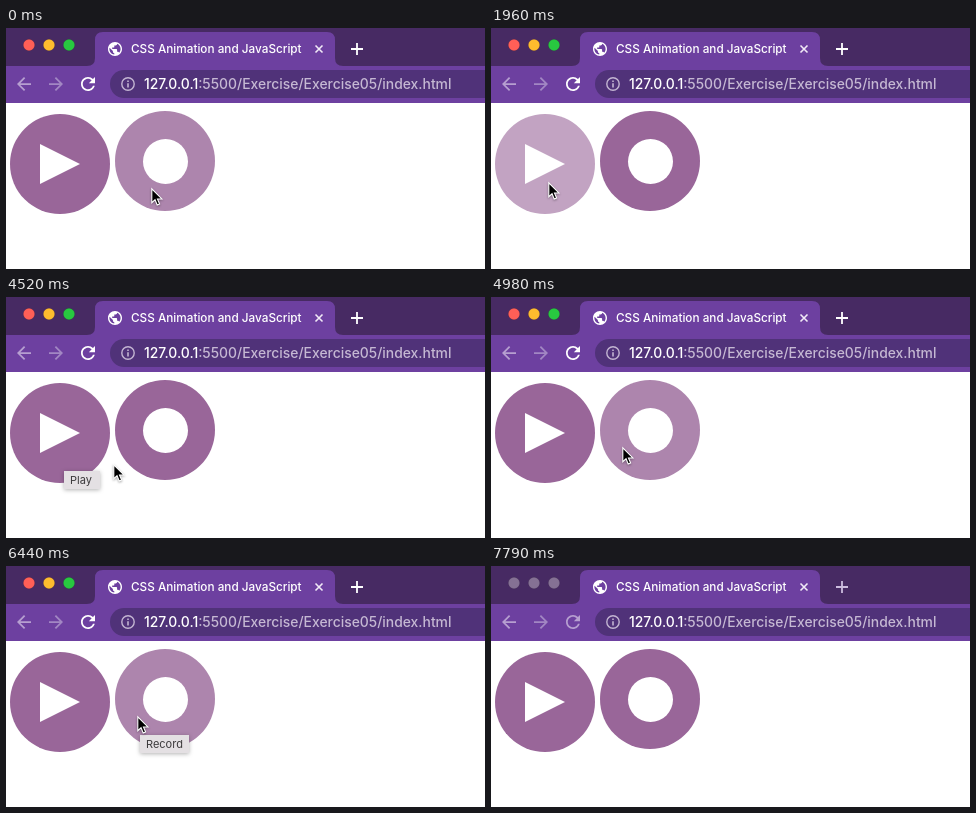
Write an HTML page that moves like this. It is 479 by 241 pixels and loops after 7.81 s.

```html
<!DOCTYPE html>
<html lang="en">
<head>
<meta charset="utf-8">
<title>CSS Animation and JavaScript</title>
<style>
html, body { margin: 0; width: 100%; height: 100%; overflow: hidden; background: #fff; }
svg { display: block; width: 479px; height: 241px; font-family: Inter, Roboto, sans-serif; }
#lights circle { stroke: rgba(0, 0, 0, .14); stroke-width: .7; }
#tip rect { fill: #e4e0e3; filter: drop-shadow(0 1px 2px rgba(0, 0, 0, .3)); }
#tip text { font-size: 11px; fill: #3c3a3c; }
.bar { font-weight: 500; }
.line { fill: none; stroke-width: 1.8; }
</style>
</head>
<body>
<svg viewBox="0 0 479 241">
  <defs>
    <path id="arrow" d="M20 11H7.830l5.590-5.590L12 4l-8 8 8 8 1.410-1.410L7.830 13H20z"/>
  </defs>
  <rect width="479" height="241" fill="#fff"/>

  <!-- window frame -->
  <rect width="479" height="38" fill="#472a63"/>
  <rect y="38" width="479" height="37" fill="#6d40a0"/>
  <path d="M81 38q8 0 8-8V12q0-8 8-8H321q8 0 8 8V30q0 8 8 8z" fill="#6d40a0"/>
  <g id="lights">
    <circle cx="23" cy="17" r="5.700"/>
    <circle cx="43" cy="17" r="5.700"/>
    <circle cx="63" cy="17" r="5.700"/>
  </g>
  <path transform="translate(100.600 12.600) scale(.7)" fill="#fff" d="M12 2C6.480 2 2 6.480 2 12s4.480 10 10 10 10-4.480 10-10S17.520 2 12 2zm-1 17.930c-3.950-.490-7-3.850-7-7.930 0-.620.080-1.210.210-1.790L9 15v1c0 1.100.900 2 2 2zm6.900-2.540c-.260-.810-1-1.390-1.900-1.390h-1v-3c0-.550-.450-1-1-1H8v-2h2c.550 0 1-.450 1-1V7h2c1.100 0 2-.900 2-2v-.410c2.930 1.190 5 4.060 5 7.410 0 2.080-.800 3.970-2.100 5.390z"/>
  <text class="bar" x="125" y="25" font-size="11.750" fill="#fff">CSS Animation and JavaScript</text>
  <path class="line" d="M309.500 17.500l7 7m0-7l-7 7" stroke="#f1eaf7" style="stroke-width:1.6"/>
  <path class="line" id="plus" d="M345 21h12m-6-6v12"/>

  <!-- toolbar -->
  <use href="#arrow" transform="translate(7.500 45.500) scale(.875)" fill="#b69fd0"/>
  <use href="#arrow" transform="translate(60.500 45.500) scale(-.875 .875)" fill="#a287c3"/>
  <path id="reload" transform="translate(71.500 45.500) scale(.875)" d="M17.650 6.350C16.200 4.900 14.210 4 12 4c-4.420 0-7.990 3.580-7.990 8s3.570 8 7.990 8c3.730 0 6.840-2.550 7.730-6h-2.080c-.820 2.330-3.040 4-5.650 4-3.310 0-6-2.690-6-6s2.690-6 6-6c1.660 0 3.140.690 4.220 1.780L13 11h7V4z"/>
  <rect x="104" y="42" width="400" height="28" rx="14" fill="#503279"/>
  <circle class="line" cx="122" cy="56" r="6.200" stroke="#c3b5d2" style="stroke-width:1.4"/>
  <path d="M121.200 52.500h1.600v1.600h-1.600zM121.200 55.200h1.600v4.300h-1.600z" fill="#c3b5d2"/>
  <text class="bar" x="138" y="61" font-size="13.900" fill="#c5b8d3"><tspan fill="#fff">127.0.0.1</tspan>:5500/Exercise/Exercise05/index.html</text>

  <!-- page -->
  <circle id="playDisc" cx="54" cy="136" r="50"/>
  <path id="playIcon" fill="#fff"/>
  <circle id="recDisc" cx="159" cy="133" r="50"/>
  <rect id="recIcon" x="137" y="111" width="45" height="45" fill="#fff"/>
  <g id="tip"><rect height="18"/><text x="6" y="13"></text></g>
  <g id="cursor" style="filter:drop-shadow(0 1px 1px rgba(0,0,0,.35))">
    <path transform="translate(.8 .8) scale(.9)" d="M0 0V15.500L3.600 12.200 6 18 8.700 16.900 6.300 11.300H11.200z" fill="#000" stroke="#fff" stroke-width="1.200"/>
  </g>
</svg>
<script>
const LOOP = 7810;
const $ = id => document.getElementById(id);
const set = (el, attrs) => { for (const k in attrs) el.setAttribute(k, attrs[k]); };
const within = (t, a, b) => t >= a && t < b;
const mix = (a, b, u) => a + (b - a) * u;
const blend = (a, b, u) => `rgb(${a.map((v, i) => Math.round(mix(v, b[i], u)))})`;

const WHITE = [255, 255, 255], PURPLE = [153, 102, 153], RED = [168, 8, 8];
const LIGHTS = [[255, 95, 87], [254, 188, 46], [40, 200, 64]];
const IDLE_LIGHT = [133, 113, 148], IDLE_ICON = [182, 159, 208];

const PLAY = 'M34 116L74 136 34 156z';
const PAUSE = 'M34 116h15v40h-15zM59 116h15v40h-15z';

// The pointer advances in small jumps along each polyline.
const moves = [
  { at: 300, step: 56, n: 6, pts: [[145, 160], [57, 154]] },
  { at: 4410, step: 55, n: 3, pts: [[57, 154], [107, 167]] },
  { at: 4580, step: 56, n: 6, pts: [[107, 167], [131, 150]] },
  { at: 6560, step: 57, n: 12, pts: [[131, 150], [240, 225], [462, 225]] },
  { at: 7240, step: 57, n: 4, pts: [[462, 225], [300, 182], [142, 215]] }
];

const tips = [
  { from: 3520, to: 4000, x: 58, y: 174, w: 46, label: 'Pause' },
  { from: 4350, to: 4580, x: 58, y: 174, w: 36, label: 'Play' },
  { from: 5380, to: 6080, x: 134, y: 169, w: 36, label: 'Stop' },
  { from: 6440, to: 6730, x: 134, y: 169, w: 49, label: 'Record' }
];

function pointer(t) {
  const move = moves.filter(m => t >= m.at).pop();
  if (!move) return moves[0].pts[0];
  const k = Math.min(move.n, Math.floor((t - move.at) / move.step) + 1);
  const s = k / move.n * (move.pts.length - 1);
  const i = Math.min(Math.floor(s), move.pts.length - 2);
  return [0, 1].map(c => mix(move.pts[i][c], move.pts[i + 1][c], s - i));
}

function disc(el, color, pressed, [x, y]) {
  const over = Math.hypot(x - el.cx.baseVal.value, y - el.cy.baseVal.value) < 50;
  set(el, { fill: blend(color, WHITE, pressed ? .4 : over ? .2 : 0) });
}

function drawTip(t) {
  const tip = tips.find(p => within(t, p.from, p.to));
  $('tip').style.display = tip ? '' : 'none';
  if (!tip) return;
  set($('tip'), { transform: `translate(${tip.x} ${tip.y})` });
  set($('tip').firstElementChild, { width: tip.w });
  $('tip').lastElementChild.textContent = tip.label;
}

function drawFrame(t) {
  const idle = t < 7720 ? 0 : t < 7790 ? .5 : 1;
  [...$('lights').children].forEach((c, i) => set(c, { fill: blend(LIGHTS[i], IDLE_LIGHT, idle) }));
  set($('plus'), { stroke: blend(WHITE, IDLE_ICON, idle * .7) });
  set($('reload'), { fill: blend(WHITE, IDLE_ICON, idle) });
}

function draw(t) {
  const pos = pointer(t);
  const playing = within(t, 2020, 4050);
  const recording = within(t, 5090, 6200);

  disc($('playDisc'), PURPLE, within(t, 1960, 2020) || within(t, 4000, 4050), pos);
  set($('playIcon'), { d: playing ? PAUSE : PLAY });

  disc($('recDisc'), recording ? RED : PURPLE, within(t, 5030, 5090) || within(t, 6080, 6200), pos);
  const fade = Math.min(1, Math.max(0, (t - 5090) / 500));
  set($('recIcon'), {
    rx: recording ? 3 : 22.5,
    opacity: recording ? mix(.24, 1, (1 - fade) ** 3) : 1
  });

  drawTip(t);
  drawFrame(t);
  $('cursor').style.display = t < 7470 ? '' : 'none';
  set($('cursor'), { transform: `translate(${pos[0]} ${pos[1]})` });
}

const start = performance.now();
function tick() {
  draw((performance.now() - start) % LOOP);
  requestAnimationFrame(tick);
}
tick();
</script>
</body>
</html>
```
